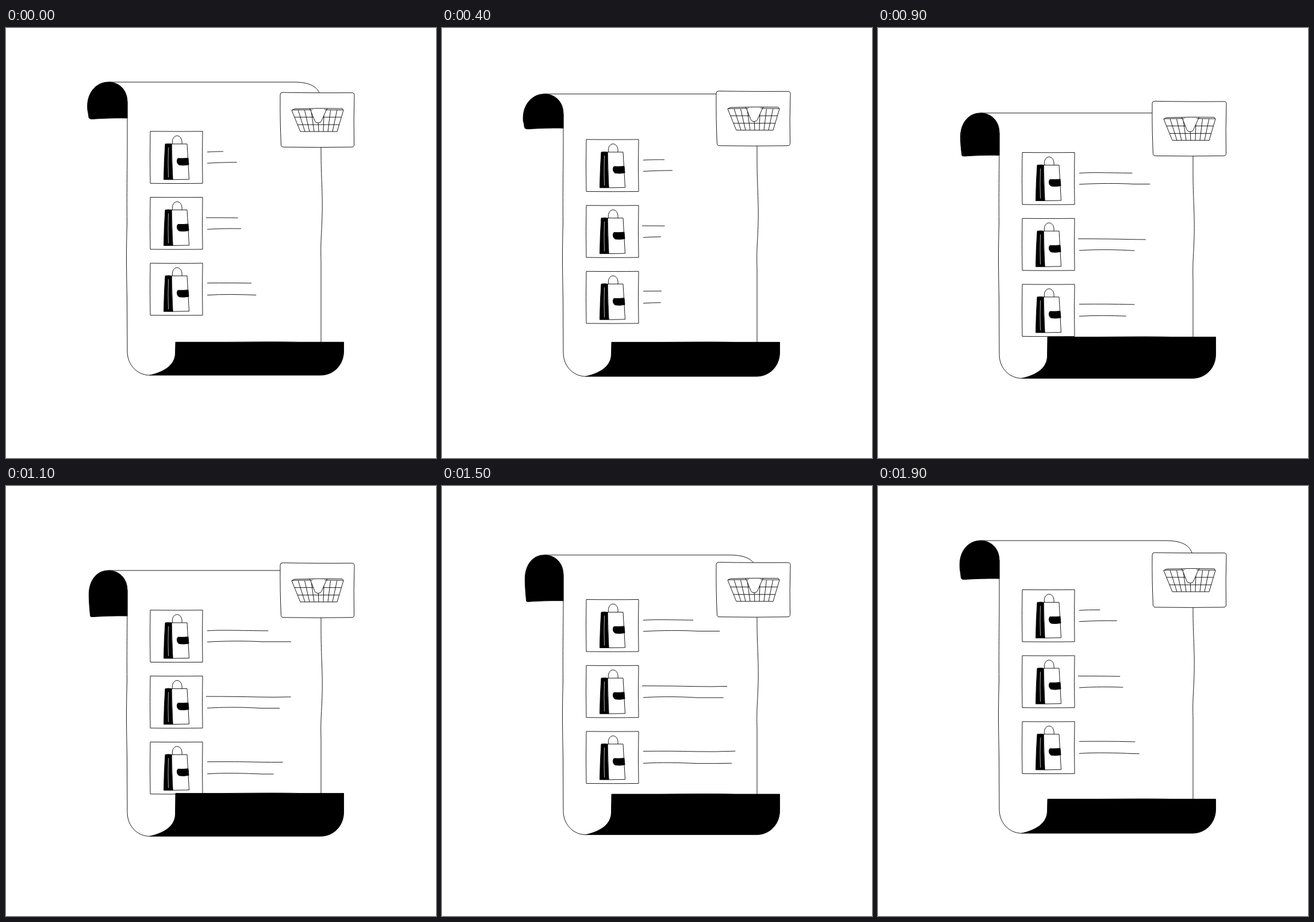
An HTML page with a canvas that plays this animation: 748x748 px, repeating every 2000 ms.

```html
<!DOCTYPE html>
<html lang="en">
<head>
<meta charset="utf-8">
<title>Shopping scroll</title>
<style>
  html, body { margin: 0; width: 100%; height: 100%; overflow: hidden; background: #fff; }
  canvas { display: block; }
</style>
</head>
<body>
<canvas id="stage" width="748" height="748"></canvas>
<script>
const ctx = document.getElementById('stage').getContext('2d');
const LOOP = 2000, STEP = 100, RISE = 1065;

// Text lines: two per product, each growing from one right end to another.
const textLines = [
  { path: 'M350 36C375 34 410 36 470 36', from: 373, to: 458 },
  { path: 'M350 55.5C380 53.5 420 53.5 445 55H520', from: 389, to: 502 },
  { path: 'M348 35.5Q400 35.5 440 36.5T525 35', from: 382, to: 511 },
  { path: 'M350 55.8C385 53.5 420 54.5 443 56H510', from: 378, to: 495 },
  { path: 'M350 34.5Q400 34 440 35T525 33.5', from: 381, to: 512 },
  { path: 'M350 55.5C380 53.5 415 54.5 445 55.8Q480 56 520 55', from: 380, to: 504 }
];

const mix = (a, b, u) => a + (b - a) * u;
const ease = u => u * u * (3 - 2 * u);

// Eases from low to high, beginning at start, and back within one loop.
function swing(t, low, high, start, rise = RISE) {
  const age = (t - start + LOOP) % LOOP;
  return age < rise
    ? mix(low, high, ease(age / rise))
    : mix(high, low, ease((age - rise) / (LOOP - rise)));
}

function draw(path, fill, stroke = '#000') {
  const shape = new Path2D(path);
  if (fill) { ctx.fillStyle = fill; ctx.fill(shape); }
  if (stroke) { ctx.strokeStyle = stroke; ctx.stroke(shape); }
}

function shifted(y, paint) {
  ctx.save();
  ctx.translate(0, y);
  paint();
  ctx.restore();
}

function drawPaper(top, shift, bottom) {
  const wave = y => y + shift;
  draw(`M178 ${top}H500C532 ${top} 548 ${top + 10} 548 ${top + 34}V${wave(215)}
    C548 ${wave(260)} 551 ${wave(285)} 550 ${wave(325)}
    C549 ${wave(360)} 547 ${wave(370)} 548 ${wave(405)}V560`);
  draw(`M211 ${top + 34}V195C211 250 210 270 210.5 340C209 390 209.5 420 210.5 470
    L211 ${bottom - 42}C211 ${bottom - 16} 230 ${bottom} 250 ${bottom}`);
}

function drawTopRoll(top, h) {
  const left = 141 + (h - 60) * 0.16;
  shifted(top, () => draw(`M178 0C197 0 211 14 211 34V${h - 1.5}
    C190 ${h - 2} 165 ${h - 1} 152 ${h}C146 ${h} ${left + 2.5} ${h} ${left + 2} ${h - 5}
    C${left + 1} ${h - 15} ${left} 52 ${left} 42C${left} 17 158 0 178 0Z`, '#000'));
}

function drawBottomRoll(lip, bottom) {
  draw(`M295 ${lip}H380Q480 ${lip - 1} 510 ${lip}H587.5V${bottom - 42}
    C587.5 ${bottom - 18} 570 ${bottom} 547 ${bottom}H250
    C268 ${bottom - 4} 294.5 ${bottom - 14} 294.5 ${bottom - 39}Z`, '#000');
}

function drawProduct() {
  draw('M251 0Q300 .5 342 0Q341 45 342 90.5Q300 91 251 90.5Q250 45 251 0Z', '#fff');
  draw('M289.5 22C287 3 308 3 306 22');
  draw('M288 22H315L318.5 83.5L290 84Z', '#fff');
  draw('M277 22Q283 21 288 22Q287 50 290 84H274.5Q275 50 277 22Z', '#000');
  draw('M282.5 28Q281.5 55 282.5 80', null, '#ccc');
  draw('M299 47Q308 47.5 317 46.5L318 58Q309 60 301 58.5Q297 56 297.5 50Z', '#000');
}

function drawBasket() {
  draw('M497 31L502 28.5Q545 27 585 28L587 31L576 68H512Z', '#fff');
  draw('M497 30.5Q540 29.5 587 30.5M502 43H583M507 56H580');
  for (let u = 1 / 8; u < 1; u += 1 / 8) {
    draw(`M${mix(497, 587, u)} 31L${mix(512, 576, u)} 68`);
  }
  draw('M529 29L537 49Q538 53 543 53Q548 53 549 49L558 29', '#fff');
  draw('M528 28Q531 33 533 29M554 29Q557 32 559 28');
}

function drawCard() {
  draw(`M481 0Q545 1 602 .5Q606 .5 606 5Q604.5 50 605.5 91Q605.5 95 601 95
    Q545 96 483 95Q478.5 95 478.5 91Q476.5 50 477 4Q477 0 481 0Z`, '#fff');
  drawBasket();
}

function render(t) {
  const top = swing(t, 94, 149, -20, 1005);
  const shift = (top - 94) * 0.683;
  const bottom = 604 + (top - 94) * 0.1;
  const rowY = row => 179.7 + shift + row * 114.7;

  ctx.fillStyle = '#fff';
  ctx.fillRect(0, 0, 748, 748);
  ctx.lineWidth = 0.9;
  ctx.lineJoin = 'round';

  drawPaper(top, shift, bottom);
  drawTopRoll(top, swing(t, 59.8, 83.3, 260));
  for (let row = 0; row < 3; row++) shifted(rowY(row), drawProduct);
  textLines.forEach(({ path, from, to }, i) => {
    const end = swing(t, from, to, 130 + i * 60);
    shifted(rowY(Math.floor(i / 2)), () => {
      ctx.setLineDash([end - 349.5, LOOP]);
      draw(path);
    });
  });
  drawBottomRoll(swing(t, 548, 533.7, 195), bottom);
  shifted(swing(t, 107.8, 136.2, 230), drawCard);
}

function tick() {
  render(Math.floor(performance.now() / STEP) * STEP % LOOP);
  requestAnimationFrame(tick);
}
tick();
</script>
</body>
</html>
```
